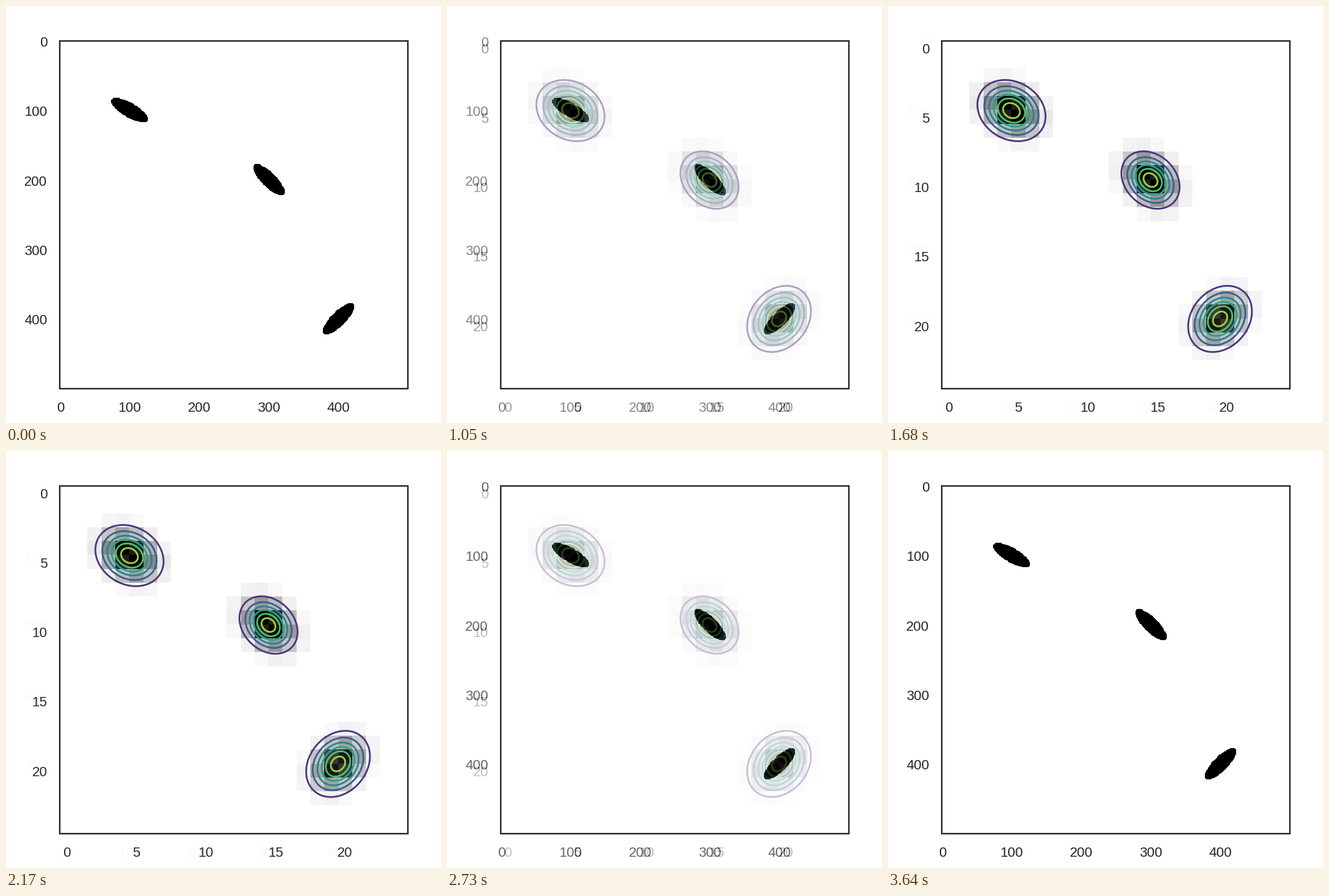
A matplotlib script that plays this animation: 696x668 px, repeating every 3990 ms.

```python
import numpy as np
import matplotlib.pyplot as plt
from matplotlib.animation import FuncAnimation
from matplotlib.patches import Rectangle

W, H, DPI = 696, 668, 100
LEFT, TOP, SIDE = 86.3, 56.3, 556.2      # plot box in pixels
FRAMES, STEP = 57, 70
INK = "0.15"
PX = 72 / DPI                            # points per pixel

plt.rcParams["font.family"] = "Liberation Sans"
fig = plt.figure(figsize=(W / DPI, H / DPI), dpi=DPI, facecolor="white")

# center (fraction of the box), tilt of the black ellipse in degrees
ELLIPSES = [(0.2, 0.2, 30), (0.6, 0.4, 45), (0.8, 0.8, -45)]
# contour peak, half width, half height, correlation (outermost line, pixels)
RINGS = [(6.75, 54.5, 49, 0.19), (6.7, 46.5, 46, 0.24), (6.6, 51, 53, -0.23)]
# tile peak, variance x, variance y, correlation (in tiles)
TILES = [(1.0, 1.22, 0.98, 0.27), (1.0, 1.05, 1.05, 0.28), (0.9, 1.05, 1.05, -0.28)]


def bell(dx, dy, var_x, var_y, rho):
    q = dx**2 / var_x + dy**2 / var_y - 2 * rho * dx * dy / np.sqrt(var_x * var_y)
    return np.exp(-q / (2 * (1 - rho**2)))


def stage():
    fig.clear()
    ax = fig.add_axes([0, 0, 1, 1])
    ax.axis("off")
    return ax


def fit_stage(ax):
    ax.set_aspect("auto")
    ax.set_xlim(0, W)
    ax.set_ylim(H, 0)


def show_gray(ax, darkness):
    ax.imshow(1 - darkness, cmap="gray", vmin=0, vmax=1, interpolation="nearest",
              extent=(LEFT, LEFT + SIDE, TOP + SIDE, TOP), aspect="auto")


def box_and_labels(ax, cells, tick_step):
    ax.add_patch(Rectangle((LEFT, TOP), SIDE, SIDE, fill=False,
                           ec=INK, lw=2.4 * PX, zorder=5))
    style = dict(fontsize=22 * PX, color=INK, va="baseline")
    for tick in range(0, cells, tick_step):
        offset = (tick + 0.5) * SIDE / cells
        ax.text(LEFT + offset, 649.5, str(tick), ha="center", **style)
        ax.text(66, TOP + offset + 8.3, str(tick), ha="right", **style)


def snapshot(ax):
    fit_stage(ax)
    fig.canvas.draw()
    return np.array(fig.canvas.buffer_rgba())[..., :3] / 255.0


def ellipse_scene():
    ax = stage()
    y, x = np.mgrid[0:500, 0:500]
    mask = np.zeros((500, 500))
    for cx, cy, tilt in ELLIPSES:
        dx, dy, a = x - 500 * cx, y - 500 * cy, np.radians(tilt)
        u = dx * np.cos(a) + dy * np.sin(a)
        v = dy * np.cos(a) - dx * np.sin(a)
        mask[(u / 30.4) ** 2 + (v / 10.4) ** 2 <= 1] = 1
    show_gray(ax, mask)
    box_and_labels(ax, 500, 100)
    return snapshot(ax)


def density_scene():
    ax = stage()
    row, col = np.mgrid[0:25, 0:25] + 0.5
    py, px = np.mgrid[TOP:TOP + SIDE:2, LEFT:LEFT + SIDE:2]
    tiles, surface = np.zeros(row.shape), np.zeros(px.shape)
    for (cx, cy, _), (peak, rx, ry, rho), (dark, vx, vy, tile_rho) in zip(
            ELLIPSES, RINGS, TILES):
        tiles += dark / 0.83 * bell(col - 25 * cx, row - 25 * cy, vx, vy, tile_rho)
        spread = 2 * np.log(peak)
        surface += peak * bell(px - LEFT - SIDE * cx, py - TOP - SIDE * cy,
                               rx**2 / spread, ry**2 / spread, rho)
    tiles[tiles < 0.02] = 0
    show_gray(ax, np.clip(tiles, 0, 1))
    ax.contour(px, py, surface, levels=range(1, 7), cmap="viridis",
               vmin=0, vmax=7, linewidths=2.8 * PX)
    box_and_labels(ax, 25, 5)
    return snapshot(ax)


def ease(t):
    """Cubic Bezier easing with control points (.25, .1) and (.25, 1)."""
    s = np.linspace(0, 1, 300)
    a, b = 3 * s * (1 - s) ** 2, 3 * s**2 * (1 - s)
    return np.interp(t, 0.25 * a + 0.25 * b + s**3, 0.1 * a + b + s**3)


ellipses = ellipse_scene()
density = density_scene()

ax = stage()
picture = ax.imshow(ellipses, extent=(0, W, H, 0), interpolation="nearest")
fit_stage(ax)


def draw(frame):
    t = frame * STEP
    mix = ease((t - 740) / 1150) - ease((t - 2110) / 1500)
    picture.set_data(np.clip(ellipses + (density - ellipses) * mix, 0, 1))
    return [picture]


animation = FuncAnimation(fig, draw, frames=FRAMES, interval=STEP, repeat=True)
plt.show()
```
